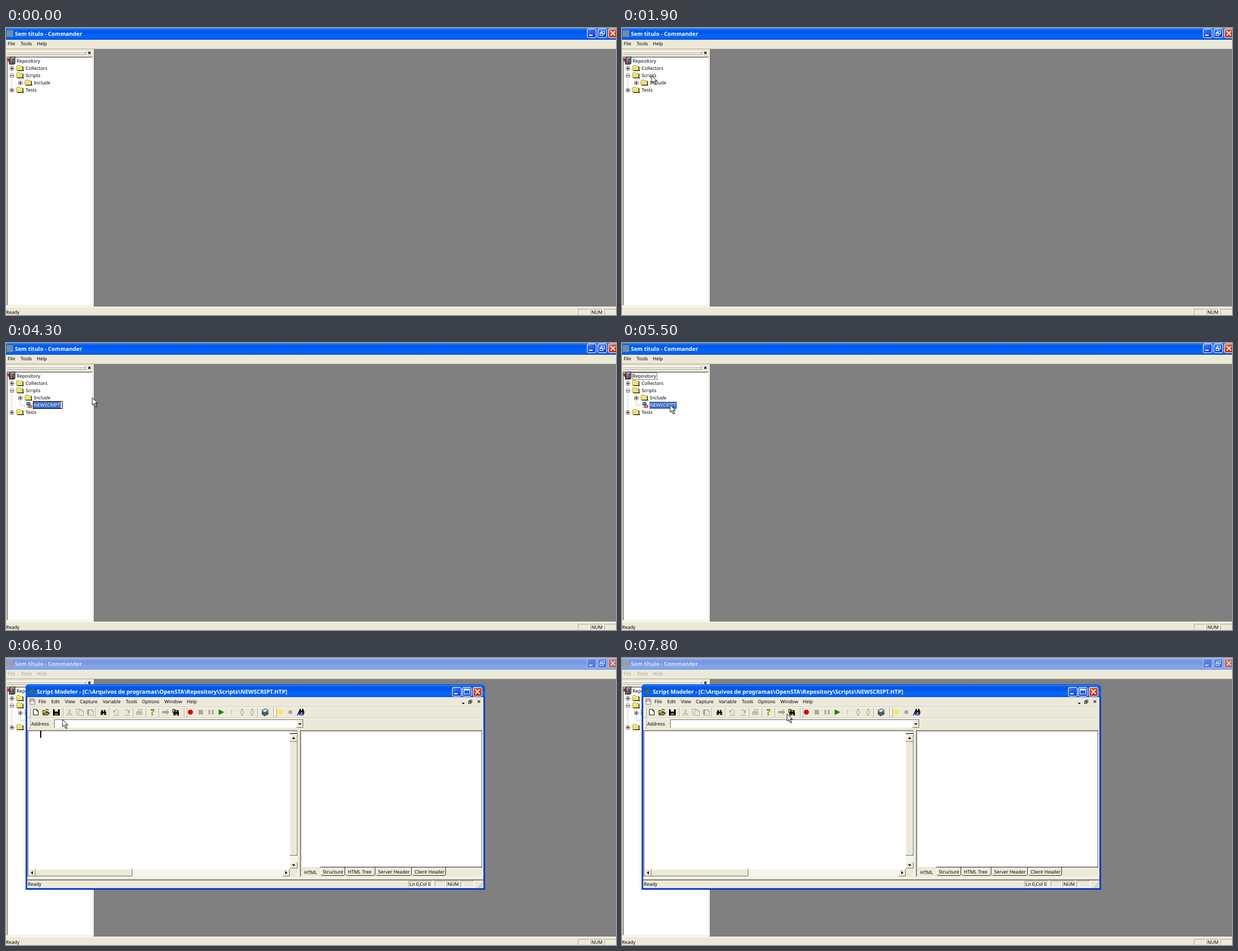
An HTML page with a canvas that plays this animation: 1090x514 px, repeating every 8000 ms.

```html
<!DOCTYPE html>
<html lang="pt">
<head>
<meta charset="utf-8">
<title>Script recorder</title>
<style>
html, body { margin: 0; width: 100%; height: 100%; overflow: hidden; background: #808080; }
canvas { display: block; }
</style>
</head>
<body>
<canvas id="stage" width="1090" height="514"></canvas>
<script>
const c = document.getElementById('stage').getContext('2d');
const LOOP = 8000;
const FACE = '#ece9d8', SHADE = '#aca899', DARK = '#716f64', BLUE = '#316ac5', GREY = '#a7a596';

// ---- basic helpers ----
function box(x, y, w, h, fill) { c.fillStyle = fill; c.fillRect(x, y, w, h); }

function text(s, x, y, color = '#000', font = '8.4px') {
  c.font = font + ' "Noto Sans", "Open Sans", sans-serif';
  c.fillStyle = color;
  c.fillText(s, x, y);
}

function poly(points, fill, stroke, width = 1, close = true) {
  c.beginPath();
  for (let i = 0; i < points.length; i += 2) c.lineTo(points[i], points[i + 1]);
  if (close) c.closePath();
  if (fill) { c.fillStyle = fill; c.fill(); }
  if (stroke) { c.strokeStyle = stroke; c.lineWidth = width; c.stroke(); }
}

const line = (points, color, width = 1) => poly(points, null, color, width, false);

function disc(x, y, r, fill) {
  c.fillStyle = fill;
  c.beginPath();
  c.arc(x, y, r, 0, 7);
  c.fill();
}

function ring(x, y, r, color, from = 0, to = 7) {
  c.strokeStyle = color;
  c.lineWidth = 1;
  c.beginPath();
  c.arc(x, y, r, from, to);
  c.stroke();
}

function edge(x, y, w, h, topLeft, bottomRight) {
  box(x, y, w, 1, topLeft);
  box(x, y, 1, h, topLeft);
  box(x, y + h - 1, w, 1, bottomRight);
  box(x + w - 1, y, 1, h, bottomRight);
}

// sunken white field with a two-tone rim
function well(x, y, w, h) {
  box(x, y, w, h, '#fff');
  edge(x, y, w, h, SHADE, '#fff');
  edge(x + 1, y + 1, w - 2, h - 2, DARK, FACE);
}

function dotted(x, y, w, h, color = '#000') {
  for (let i = 0; i < w; i += 2) { box(x + i, y, 1, 1, color); box(x + i, y + h - 1, 1, 1, color); }
  for (let i = 0; i < h; i += 2) { box(x, y + i, 1, 1, color); box(x + w - 1, y + i, 1, 1, color); }
}

function dots(x, y, w, h) {
  for (let i = 0; i < Math.max(w, h); i += 2) box(x + (w ? i : 0), y + (h ? i : 0), 1, 1, '#999');
}

function fade(x0, y0, x1, y1, colors) {
  const g = c.createLinearGradient(x0, y0, x1, y1);
  colors.forEach((v, i) => g.addColorStop(i / (colors.length - 1), v));
  return g;
}

const cross = (x, y, r, color, w) => {
  line([x - r, y - r, x + r, y + r], color, w);
  line([x + r, y - r, x - r, y + r], color, w);
};

const menu = (items, y, color) => items.forEach(([s, x]) => text(s, x, y, color));

// ---- window chrome ----
function capButton(x, y, kind, dim) {
  c.beginPath();
  c.roundRect(x + .5, y + .5, 16, 16, 2.5);
  const tint = kind === 'close' ? ['#f0906c', '#dc4a22', '#c63a12'] : ['#5e97f8', '#2a63e4', '#1c4fd0'];
  const pale = kind === 'close' ? ['#d98a83', '#cb6a63', '#c0655c'] : ['#6f94ea', '#587fdf', '#5279dc'];
  c.fillStyle = fade(x, y, x + 8, y + 16, dim ? pale : tint);
  c.fill();
  c.strokeStyle = dim ? '#bccdf3' : '#fff';
  c.lineWidth = 1;
  c.stroke();
  const ink = dim ? '#d3def8' : '#fff';
  if (kind === 'min') box(x + 4, y + 11, 6, 2, ink);
  if (kind === 'max') { edge(x + 3, y + 3, 11, 10, ink, ink); box(x + 3, y + 3, 11, 3, ink); }
  if (kind === 'restore') {
    edge(x + 6, y + 4, 7, 6, ink, ink);
    box(x + 4, y + 7, 6, 6, dim ? '#587fdf' : '#2a63e4');
    edge(x + 4, y + 7, 6, 6, ink, ink);
    box(x + 4, y + 7, 6, 2, ink);
  }
  if (kind === 'close') cross(x + 8.5, y + 8.5, 3.8, ink, 1.8);
}

function caption(x, y, w, h, dim) {
  box(x, y, w, h, dim
    ? fade(0, y, 0, y + h, ['#a2baf0', '#7b99e3', '#7895e0', '#809fe8', '#86a6ec', '#7d9be2'])
    : fade(0, y, 0, y + h, ['#3a90ff', '#0560ee', '#0055e4', '#005bf0', '#0066ff', '#0064fb', '#0047cf']));
}

function mainCaption(title, dim) {
  caption(0, 0, 1090, 21, dim);
  text(title, 16, 14, dim ? '#d8e4f8' : '#fff', 'bold 9.9px');
  capButton(1038, 1, 'min', dim);
  capButton(1057, 1, 'restore', dim);
  capButton(1076, 1, 'close', dim);
}

function pane(x, y, w, h, label) {
  edge(x, y, w, h, SHADE, '#fff');
  if (label) text(label, x + 2, y + 9);
}

// ---- repository tree ----
function folder(x, y) {
  poly([x, y - 4, x + 1, y - 5, x + 5, y - 5, x + 6, y - 3.5, x + 11, y - 3.5, x + 11, y + 4, x, y + 4], '#ece45a', '#8a8630', .8);
  box(x + 1, y - 3, 9, 1, '#fffbb4');
  box(x + 1, y + 4, 12, 1, '#000');
  box(x + 11, y - 3, 1, 8, '#000');
}

function toggle(x, y, open) {
  box(x - 3, y - 3, 7, 7, '#fff');
  edge(x - 3, y - 3, 7, 7, '#8c8c8c', '#8c8c8c');
  box(x - 2, y, 5, 1, '#000');
  if (!open) box(x, y - 2, 1, 5, '#000');
}

function label(s, x, y, chosen) {
  if (chosen) {
    const w = Math.round(c.measureText(s).width);
    box(x - 1, y - 6, w + 3, 13, BLUE);
    dotted(x - 1, y - 6, w + 3, 13, '#d9a45a');
  }
  text(s, x, y + 3, chosen ? '#fff' : '#000');
}

function branch(s, level, y, open, chosen) {
  const x = level ? 25 : 10;
  dots(x, y, 8, 0);
  toggle(x, y, open);
  folder(x + 9, y);
  c.font = '8.4px "Noto Sans", "Open Sans", sans-serif';
  label(s, x + 25, y, chosen);
}

function repositoryIcon() {
  poly([6, 54, 8, 52, 16, 52, 16, 63, 14, 65, 6, 65], '#bbb', '#111', 1.2);
  line([14, 54, 14, 65], '#111');
  edge(7, 55, 6, 4, '#222', '#222');
  edge(7, 60, 6, 4, '#222', '#222');
  line([3, 56, 12, 63], '#333');
  poly([2, 55, 6, 54, 8, 58, 4, 61], '#a0225e');
}

function scriptIcon(x, y) {
  disc(x - 1, y - 2, 3.8, '#2376c4');
  disc(x - 2, y - 3, 1.7, '#37b367');
  box(x - 4, y + 3, 7, 2, '#d7a52a');
  disc(x + 2.5, y + 2.5, 3.2, '#e22a22');
  cross(x + 2.5, y + 2.5, 1.4, '#fff', 1);
}

function tree(t) {
  const made = t >= 4300, editing = made && t < 5100;
  const focus = t >= 2300 && !editing && t < 5900;
  const last = made ? 124 : 111;
  well(1, 51, 155, 447);
  repositoryIcon();
  text('Repository', 19, 62);
  if (focus) dotted(18, 53, 45, 13);
  dots(10, 66, 0, last - 66);
  dots(25, 91, 0, made ? 20 : 7);
  branch('Collectors', 0, 72, false);
  branch('Scripts', 0, 85, true, t >= 2300 && !made);
  branch('Include', 1, 98, false);
  branch('Tests', 0, last, false);
  if (!made) return;
  dots(25, 111, 9, 0);
  scriptIcon(41, 111);
  label('NEWSCRIPT', 50, 111, true);
  if (editing) edge(48, 104, 53, 14, '#000', '#000');
}

function commander(t) {
  const dim = t >= 5900;
  box(0, 0, 1090, 514, FACE);
  mainCaption('Sem título - Commander', dim);
  box(1, 4, 12, 12, dim ? '#9c9f9b' : '#6f8ca0');
  menu([['File', 3], ['Tools', 26], ['Help', 55]], 31, dim ? GREY : '#000');
  box(157, 37, 933, 463, '#808080');
  box(0, 37, 1090, 1, SHADE);
  box(157, 38, 1, 462, DARK);
  for (const y of [42, 45]) edge(2, y, 141, 3, '#fff', SHADE);
  cross(149, 44.5, 2, '#000', 1.2);
  tree(t);
  box(0, 499, 1090, 1, '#fff');
  if (t < 600 || t >= 2400) text('Ready', 0, 512);
  pane(1022, 503, 21, 12);
  pane(1044, 503, 23, 12, 'NUM');
  pane(1069, 503, 22, 12);
}

function popup(x, y, w, h) {
  box(x + 2, y + 2, w + 1, h + 1, 'rgba(0,0,0,.25)');
  box(x + 1, y + 1, w + 1, h + 1, 'rgba(0,0,0,.25)');
  box(x, y, w, h, '#fff');
  edge(x, y, w, h, SHADE, SHADE);
}

function contextMenu(t) {
  if (t < 2400 || t >= 4100) return;
  const hot = t >= 3100, http = t >= 3800;
  popup(57, 89, 73, 17);
  if (hot) box(59, 91, 69, 13, BLUE);
  const ink = hot ? '#fff' : '#000';
  text('New Script', 71, 101, ink);
  poly([122, 94, 126, 97.5, 122, 101], ink);
  if (t < 3300) return;
  popup(128, 89, 55, 17);
  if (http) box(130, 91, 51, 13, BLUE);
  text('HTTP', 143, 101, http ? '#fff' : '#000');
}

// ---- script modeler ----
function opening() {
  box(0, 0, 1090, 514, '#fff');
  mainCaption('Script Modeler');
  disc(8, 10, 5, '#3c6a62');
  box(0, 21, 1090, 15, FACE);
  menu([['File', 3], ['View', 26], ['Tools', 53], ['Options', 83], ['Help', 122]], 31);
  box(26, 35, 903, 20, fade(26, 0, 929, 0, ['#0050e0', '#186cf2', '#3690ff']));
  disc(37, 44, 5, '#3c6a62');
  text('Script Modeler', 47, 48, '#fff', 'bold 9.9px');
}

function page(x, y, fill, ink) {
  poly([x - 4, y - 5, x + 2, y - 5, x + 4.5, y - 2, x + 4.5, y + 5, x - 4, y + 5], fill, ink);
  line([x + 2, y - 5, x + 2, y - 2, x + 4.5, y - 2], ink);
}

function binoculars(x, y, ink) {
  poly([x - 5, y + 5, x - 5, y + 1, x - 3, y - 4, x - 1, y - 4, x - 1, y + 5], ink);
  poly([x + 5, y + 5, x + 5, y + 1, x + 3, y - 4, x + 1, y - 4, x + 1, y + 5], ink);
  box(x - 1, y - 1, 2, 3, ink);
  box(x - 4, y + 2, 1, 2, '#ddd');
  box(x + 2, y + 2, 1, 2, '#ddd');
}

function watch(x, y) {
  ring(x, y, 3, GREY);
  box(x - 1.5, y - 6, 3, 2, GREY);
  box(x - 1.5, y + 4, 3, 2, GREY);
}

function toolbar(y) {
  edge(41, y - 8, 3, 17, '#fff', SHADE);
  for (const x of [102, 160, 184, 227, 250, 273, 318, 449, 478]) {
    box(x, y - 8, 1, 17, SHADE);
    box(x + 1, y - 8, 1, 17, '#fff');
  }
  for (const x of [321, 481]) edge(x, y - 8, 3, 17, '#fff', SHADE);
  page(53, y, '#fff', '#000');
  poly([66, y + 4, 66, y - 3, 70, y - 3, 71, y - 1, 75, y - 1, 75, y + 4], '#e8dc60', '#000');
  poly([66, y + 5, 69, y + 1, 78, y + 1, 75, y + 5], '#b5a422', '#000');
  line([71, y - 5, 75, y - 5, 76, y - 3], '#000');
  box(84, y - 5, 12, 11, '#000');
  box(87, y - 5, 6, 4, FACE);
  box(87, y + 2, 6, 3, '#8a8a20');
  line([111, y - 5, 115, y + 2], GREY);
  line([116, y - 5, 112, y + 2], GREY);
  ring(111, y + 4, 1.6, GREY);
  ring(116, y + 4, 1.6, GREY);
  page(130, y - 1, FACE, GREY);
  page(134, y + 1, FACE, GREY);
  box(145, y - 5, 9, 10, GREY);
  page(152, y + 1, FACE, GREY);
  binoculars(174, y, '#000');
  for (const [x, d] of [[197, -1], [216, 1]]) {
    ring(x, y, 4, GREY, 3.7, 7.6);
    poly([x + 5 * d, y - 4, x + 5 * d, y + 1, x + d, y], GREY);
    box(x - 5, y + 5, 10, 1, GREY);
  }
  poly([235, y - 1, 237, y - 5, 243, y - 5, 241, y - 1], FACE, GREY);
  poly([233, y, 243, y, 243, y + 4, 233, y + 4], '#c9c6b6', GREY);
  text('?', 258.5, y + 5, '#000', 'bold 14px');
  text('?', 259.5, y + 4, '#e8dc20', 'bold 11px');
  poly([279, y - 2, 286, y - 2, 286, y - 5, 292, y, 286, y + 5, 286, y + 2, 279, y + 2], GREY);
  poly([298, y + 1, 298, y - 5, 302, y - 5, 303, y - 3, 308, y - 3, 308, y + 1], '#e0d440', '#000');
  binoculars(304, y + 1, '#000');
  disc(329.5, y, 4.5, '#d80000');
  box(344, y - 4, 8, 8, GREY);
  box(362, y - 4, 3, 8, GREY);
  box(368, y - 4, 3, 8, GREY);
  poly([380, y - 5, 390, y, 380, y + 5], '#008a00');
  text('!', 401.5, y + 4, GREY, '11px');
  watch(422, y);
  watch(440, y);
  for (const d of [3, 0, -3]) {
    poly([457, y + d, 464, y + d - 3, 469, y + d, 462, y + d + 4], d < 0 ? '#dce8f4' : '#4d83a5', '#111', .9);
  }
  for (let a = 0; a < 4; a++) {
    const u = Math.cos(a * Math.PI / 4) * 4.5, v = Math.sin(a * Math.PI / 4) * 4.5;
    line([489.5 - u, y - v, 489.5 + u, y + v], '#ffee00', 1.4);
  }
  disc(508, y, 3.5, GREY);
  binoculars(528, y - 2, '#111');
  text('Aa', 520, y + 6, '#1428b4', 'bold 9.5px');
}

function button(x, y, w, h) {
  box(x, y, w, h, FACE);
  edge(x, y, w, h, '#fff', DARK);
}

// arrow points along (dx, dy)
function arrowButton(x, y, w, h, dx, dy) {
  button(x, y, w, h);
  const u = x + w / 2, v = y + h / 2;
  poly([u + dx * 2, v + dy * 2,
    u - dx * 1.5 - dy * 3, v - dy * 1.5 - dx * 3,
    u - dx * 1.5 + dy * 3, v - dy * 1.5 + dx * 3], '#000');
}

function editor(t) {
  well(38, 129, 484, 264);
  box(507, 131, 13, 260, '#f6f4ec');
  button(507, 131, 14, 5);
  box(507, 135, 14, 1, '#000');
  arrowButton(507, 137, 14, 13, 0, -1);
  button(507, 150, 14, 204);
  arrowButton(507, 365, 14, 12, 0, 1);
  box(40, 378, 480, 13, '#f6f4ec');
  arrowButton(40, 378, 13, 13, -1, 0);
  button(53, 378, 173, 13);
  arrowButton(494, 378, 13, 13, 1, 0);
  box(507, 378, 13, 13, FACE);
  const caret = t < 6500 || (t >= 7100 && t < 7800);
  if (caret) box(61, 130, 2, 13, '#000');
}

function preview() {
  box(525, 129, 327, 264, FACE);
  edge(525, 129, 327, 264, SHADE, '#fff');
  box(526, 130, 325, 1, DARK);
  box(526, 130, 1, 261, DARK);
  box(529, 133, 320, 241, '#fff');
  box(850, 131, 1, 244, DARK);
  box(529, 374, 322, 1, '#222');
  box(529, 374, 32, 17, FACE);
  text('HTML', 533, 387);
  for (const [s, x, w] of [['Structure', 562, 44], ['HTML Tree', 607, 53], ['Server Header', 661, 64], ['Client Header', 726, 60]]) {
    box(x, 375, w, 15, FACE);
    box(x, 375, 1, 13, '#fff');
    line([x + w - .5, 375, x + w - .5, 388, x + w - 2, 389.5, x + 2, 389.5, x + .5, 388], '#333');
    text(s, x + 4, 386);
  }
}

function modeler(t) {
  c.save();
  c.beginPath();
  c.roundRect(35, 47, 821, 368, [6, 6, 0, 0]);
  c.clip();
  box(35, 47, 821, 368, '#0a48e2');
  caption(35, 47, 821, 24);
  box(35, 47, 821, 1, '#0a4fd8');
  edge(35, 70, 821, 345, '#0831d9', '#0026b8');
  c.restore();
  disc(46, 60, 5, '#3c6a62');
  text('Script Modeler - [C:\\Arquivos de programas\\OpenSTA\\Repository\\Scripts\\NEWSCRIPT.HTP]', 55, 64, '#fff', 'bold 10.05px');
  capButton(797, 52, 'min');
  capButton(815, 52, 'max');
  capButton(834, 52, 'close');
  box(38, 70, 815, 342, FACE);

  page(47, 78, '#fff', '#777');
  text('SCL', 42, 78, '#d01818', 'bold 5px');
  menu([['File', 58], ['Edit', 81], ['View', 105], ['Capture', 132], ['Variable', 173], ['Tools', 214],
    ['Options', 243], ['Window', 283], ['Help', 323]], 81);
  box(815, 80, 4, 2, '#222');
  edge(828, 75, 5, 5, '#222', '#222');
  edge(826, 77, 5, 5, '#222', '#222');
  cross(845, 78, 2.4, '#222', 1.3);
  for (const y of [87, 107]) {
    box(38, y, 815, 1, '#d0ccba');
    box(38, y + 1, 815, 1, '#fff');
  }
  toolbar(97);
  edge(41, 110, 3, 16, '#fff', SHADE);
  text('Address', 45, 121);
  box(86, 110, 446, 16, '#fff');
  edge(86, 110, 446, 16, DARK, FACE);
  button(519, 111, 12, 14);
  poly([522, 117, 528, 117, 525, 120], '#000');

  editor(t);
  preview();
  box(38, 397, 815, 1, '#222');
  text('Ready', 39, 408);
  pane(719, 399, 44, 12, 'Ln 0,Col 0');
  pane(766, 399, 20, 12);
  pane(787, 399, 22, 12, 'NUM');
  pane(812, 399, 25, 12);
  for (const d of [3, 6, 9]) line([852 - d, 411, 852, 411 - d], SHADE);
}

// ---- pointer ----
// [time, x, y, glide start]; without a glide start the pointer jumps
const PATH = [
  [400, 72, 0], [1300, 46, 66, 400], [1900, 53, 85, 1600], [2300, 57, 90, 2000], [2600, 56, 85, 2500],
  [3100, 68, 92], [3300, 81, 98], [3600, 118, 98], [3800, 154, 98], [4600, 99, 137],
  [4900, 112, 132], [5100, 114, 124], [5300, 98, 116], [5500, 86, 111],
  [6100, 101, 110], [6700, 140, 121, 6100], [7100, 201, 117], [7500, 238, 105], [7800, 295, 100]
];

function pointerAt(t) {
  let [, x, y] = PATH[0];
  for (const [end, nx, ny, start = end] of PATH) {
    if (t >= end) { x = nx; y = ny; continue; }
    if (t > start) {
      const k = (t - start) / (end - start);
      x += (nx - x) * k;
      y += (ny - y) * k;
    }
    break;
  }
  return [Math.round(x), Math.round(y)];
}

function pointer(t) {
  if (t < 400) return;
  const arrow = [0, 0, 0, 13, 3, 10.3, 5.6, 16, 7.8, 15, 5.3, 9.5, 9.3, 9.3];
  c.save();
  c.translate(...pointerAt(t));
  c.save();
  c.translate(2, 2);
  poly(arrow, 'rgba(0,0,0,.25)');
  c.restore();
  poly(arrow, '#fff', '#000', .9);
  if (t >= 5900 && t < 6100) {
    poly([10, 3, 17, 3, 17, 4, 14, 8, 17, 12, 17, 14, 10, 14, 10, 12, 13, 8, 10, 4], '#fff', '#000', 1);
    box(9, 2, 9, 2, '#000');
    box(9, 13, 9, 2, '#000');
    poly([11.5, 6, 15.5, 6, 13.5, 9], '#000');
  }
  c.restore();
}

function draw(now) {
  const t = Math.floor((now % LOOP) / 100) * 100;
  c.textRendering = 'geometricPrecision';
  if (t >= 5900 && t < 6100) opening();
  else {
    commander(t);
    contextMenu(t);
    if (t >= 6100) modeler(t);
  }
  pointer(t);
}

const begin = performance.now();
function tick() {
  draw(performance.now() - begin);
  requestAnimationFrame(tick);
}
tick();
</script>
</body>
</html>
```
